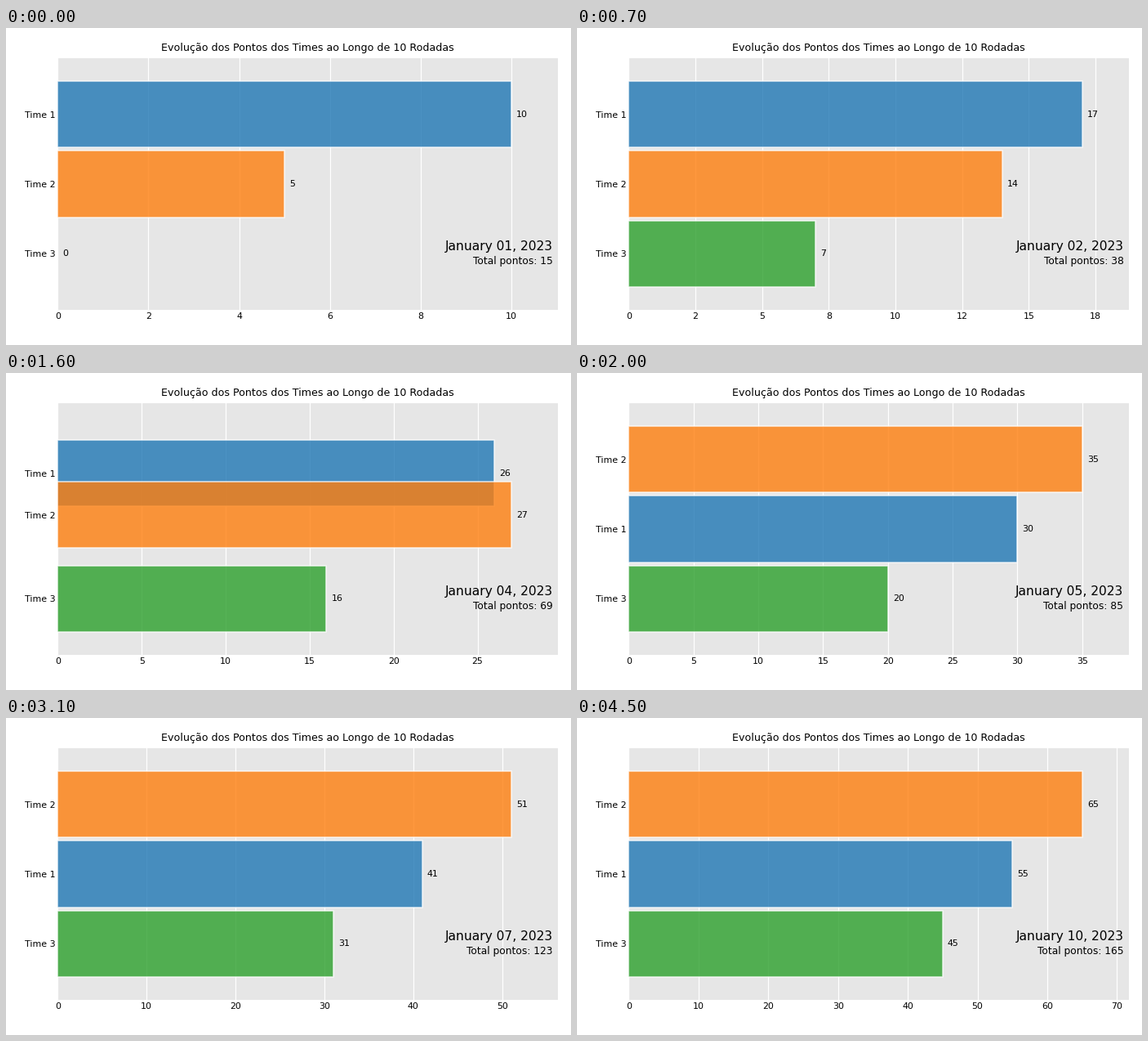
A matplotlib script for the animation above (4.6 s loop, 692x388 px).

```python
import matplotlib.pyplot as plt
import numpy as np
from matplotlib.animation import FuncAnimation

W, H, DPI = 692, 388, 72      # at 72 dpi one point is one pixel
STEPS = 5                     # frames per round
SMALL, MEDIUM, TITLE, LARGE = 11, 12.3, 12.63, 15.55

NAMES = ["Time 1", "Time 2", "Time 3"]
COLORS = ["#1f77b4", "#ff7f0e", "#2ca02c"]
rounds = np.arange(10)
points = np.array([
    10 + 5 * rounds,
    [5, 10, 20, 25, 35, 40, 50, 55, 60, 65],
    5 * rounds,
], dtype=float)
# Bar slots counted from the bottom; ties keep the column order.
order = np.argsort(-points, axis=0, kind="stable")
slots = len(NAMES) - np.argsort(order, axis=0, kind="stable")

plt.rcParams["font.family"] = "DejaVu Sans"
fig = plt.figure(figsize=(W / DPI, H / DPI), dpi=DPI, facecolor="white")
left, right, top, bottom = 63.4, 675.6, 37.2, 344.7
ax = fig.add_axes([left / W, 1 - bottom / H, (right - left) / W, (bottom - top) / H])
ax.set_facecolor(".9")
ax.set_axisbelow(True)
ax.grid(True, axis="x", color="white", lw=1.2)
ax.tick_params(length=0, labelsize=SMALL, pad=3)
ax.xaxis.set_major_formatter("{x:,.0f}")
for spine in ax.spines.values():
    spine.set_visible(False)
ax.set_title("Evolução dos Pontos dos Times ao Longo de 10 Rodadas",
             fontsize=TITLE, pad=9.2)

bars = ax.barh(slots[:, 0], points[:, 0], height=0.95, color=COLORS,
               ec="white", lw=1.5, alpha=0.8)
labels = [ax.text(0, 0, "", size=SMALL, ha="left", va="center") for _ in NAMES]
date = ax.text(0.99, 0.25, "", size=LARGE, ha="right", va="center",
               transform=ax.transAxes)
total = ax.text(0.99, 0.18, "", size=MEDIUM, ha="right", transform=ax.transAxes)
ax.set_ylim(0.2, len(NAMES) + 0.8)


def lerp_rows(rows, t):
    return np.array([np.interp(t, rounds, row) for row in rows])


def update(i):
    t = i / STEPS
    values, ys = lerp_rows(points, t), lerp_rows(slots, t)
    xmax = values.max() * 1.05 ** 2
    ax.set_xlim(0, xmax)
    ax.set_yticks(ys, NAMES)
    for bar, label, v, y in zip(bars, labels, values, ys):
        bar.set_width(v)
        bar.set_y(y - bar.get_height() / 2)
        label.set_position((v + 0.01 * xmax, y))
        label.set_text(f"{v:,.0f}")
    date.set_text(f"January {i // STEPS + 1:02d}, 2023")
    total.set_text(f"Total pontos: {values.sum():,.0f}")
    return [*bars, *labels, date, total]


frames = STEPS * (len(rounds) - 1) + 1
anim = FuncAnimation(fig, update, frames=frames, interval=100,
                     repeat=True, repeat_delay=0, blit=False)
plt.show()
```
